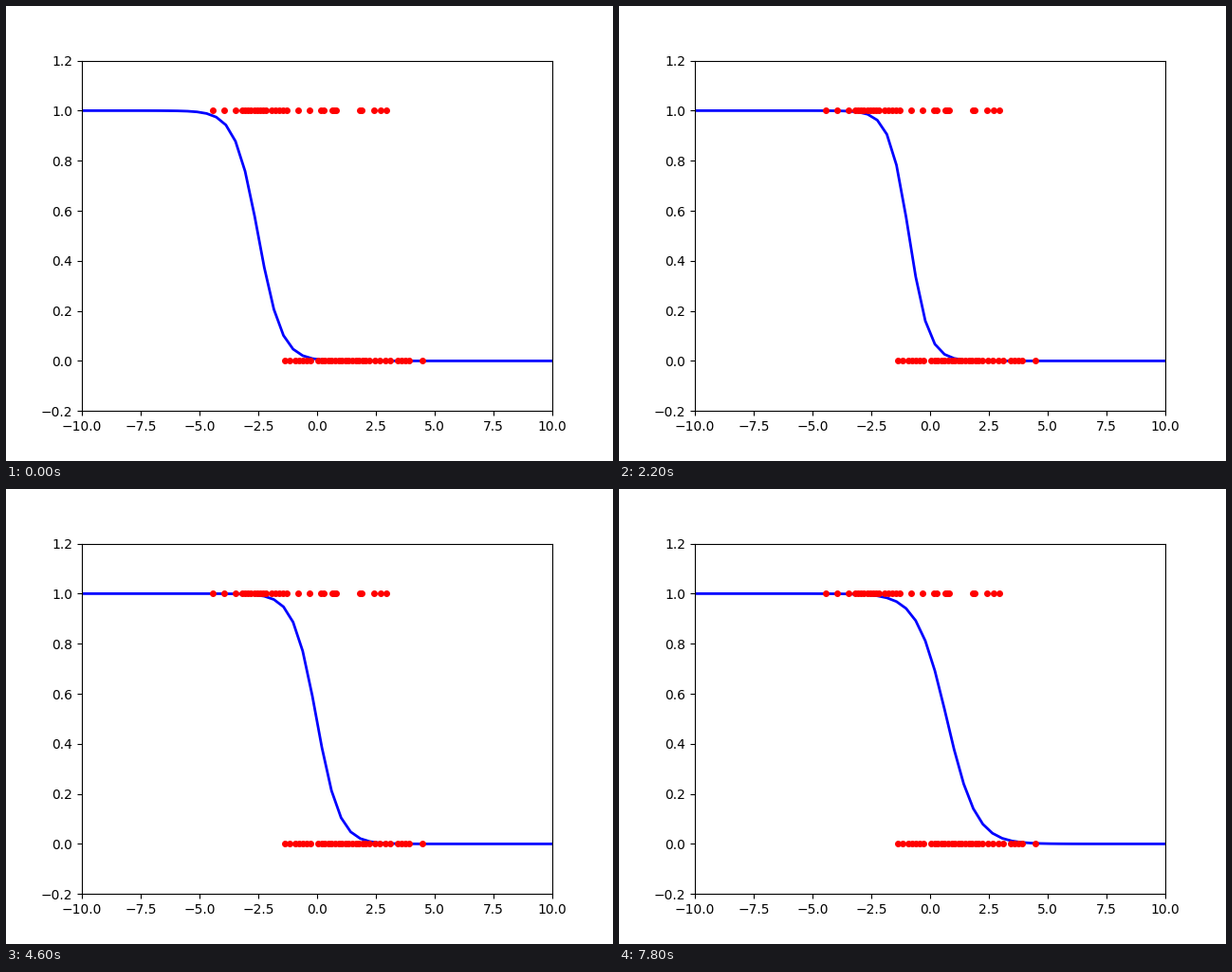
Write a matplotlib script that moves like this. It is 640 px wide and 480 px high and loops after 8 s.

```python
import numpy as np
import matplotlib.pyplot as plt
from matplotlib.animation import FuncAnimation

FRAMES, INTERVAL = 40, 200
PX_PER_UNIT, PX_ZERO = 24.8, 328

# Evenly filled clusters of samples: first pixel, last pixel, count
ONES = [(218, 242, 3), (249, 274, 9), (280, 296, 5), (308, 320, 2),
        (332, 335, 2), (344, 348, 3), (373, 375, 2), (388, 401, 3)]
ZEROS = [(294, 299, 2), (305, 321, 5), (329, 383, 16), (389, 405, 4),
         (413, 425, 4), (439, 439, 1)]


def samples(clusters):
    pixels = np.concatenate([np.linspace(*c) for c in clusters])
    return (pixels - PX_ZERO) / PX_PER_UNIT


def midpoint(step):
    """The boundary moves right, ever more slowly."""
    return -2.5 + 1.715 * np.log(1 + step / 7.1)


def steepness(step):
    """The slope sharpens early on, then relaxes."""
    return 1.3 + 1.1 / (1 + ((step - 11.8) / 16.7) ** 2)


def logistic(x, step):
    return 1 / (1 + np.exp(steepness(step) * (x - midpoint(step))))


fig, ax = plt.subplots(figsize=(6.4, 4.8), dpi=100)
ax.set_xlim(-10, 10)
ax.set_ylim(-0.2, 1.2)

grid = np.linspace(-10, 10, 50)
curve, = ax.plot(grid, logistic(grid, 0), color="blue", lw=2)
for clusters, label in ((ONES, 1), (ZEROS, 0)):
    x = samples(clusters)
    ax.plot(x, np.full(len(x), label), "ro", ms=4, zorder=2.2)


def update(step):
    curve.set_ydata(logistic(grid, step))
    return curve,


anim = FuncAnimation(fig, update, frames=FRAMES, interval=INTERVAL,
                     repeat=True, repeat_delay=0)
plt.show()
```
